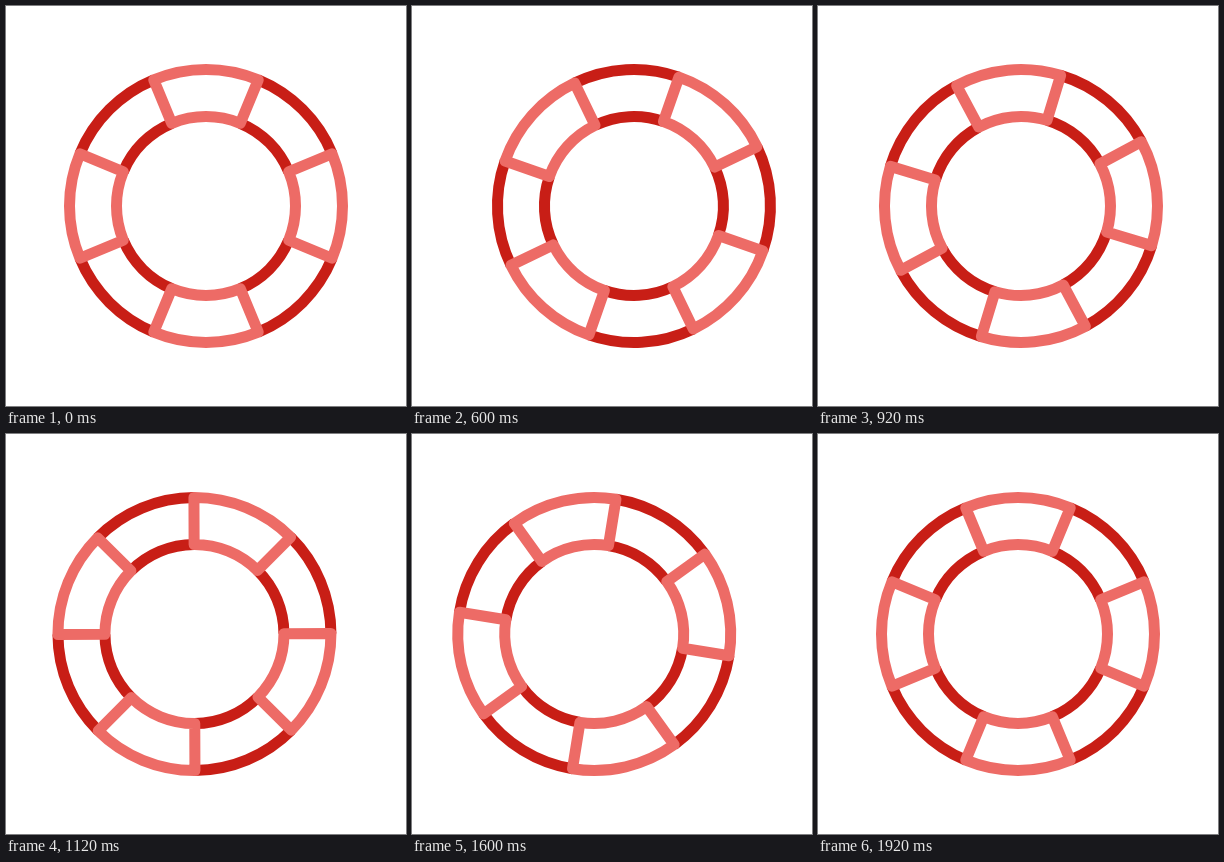
These frames come from a looping animation (400x400 px, 2 s). An HTML page:

```html
<!DOCTYPE html>
<html lang="en">
<head>
<meta charset="utf-8">
<title>Rolling life ring</title>
<style>
  html, body { margin: 0; width: 100%; height: 100%; overflow: hidden; background: #fff; }
  svg { display: block; width: 100%; height: 100%; }
</style>
</head>
<body>
<svg viewBox="0 0 400 400">
  <g id="ring" transform="translate(200 200)" fill="none" stroke-width="11" stroke-linejoin="round">
    <g stroke="#c81e16" stroke-dasharray="2 2" stroke-dashoffset="-1">
      <circle r="136.5" pathLength="16"/>
      <circle r="89.5" pathLength="16"/>
    </g>
    <g stroke="#ed6b66">
      <path id="band" d="M-52.24-126.11A136.5 136.5 0 0 1 52.24-126.11L34.25-82.69A89.5 89.5 0 0 0-34.25-82.69Z"/>
      <use href="#band" transform="rotate(90)"/>
      <use href="#band" transform="rotate(180)"/>
      <use href="#band" transform="rotate(270)"/>
    </g>
  </g>
</svg>
<script>
  const LOOP = 2000, MOVE = 1920, STEP = 40, SWING = 24;
  const ring = document.getElementById('ring');

  const ease = p => p * p * (3 - 2 * p);
  const tween = (t, t0, t1, from, to) => from + (to - from) * ease((t - t0) / (t1 - t0));

  function shift(t) {
    if (t < 480) return tween(t, 0, 480, 0, SWING);
    if (t < 1440) return tween(t, 480, 1440, SWING, -SWING);
    return tween(t, 1440, MOVE, -SWING, 0);
  }

  function draw() {
    // The ring rests briefly at the end of each loop.
    const t = Math.min(MOVE, Math.floor(performance.now() % LOOP / STEP) * STEP);
    ring.setAttribute('transform',
      `translate(${200 + shift(t)} 200) rotate(${tween(t, 0, MOVE, 0, 180)})`);
    requestAnimationFrame(draw);
  }
  draw();
</script>
</body>
</html>
```
